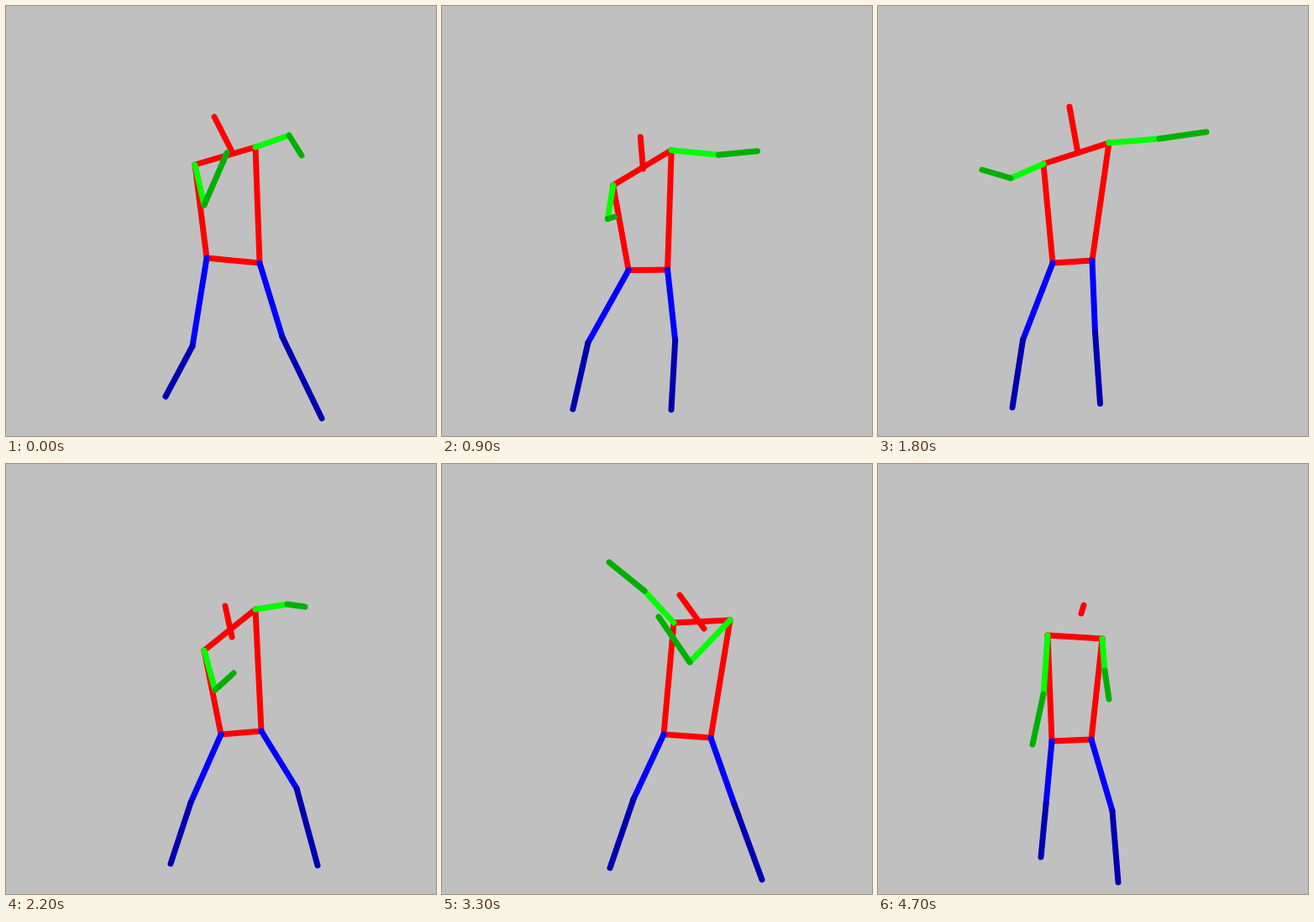
An HTML page for the animation above (4.8 s loop, 512 by 512 pixels).

```html
<!DOCTYPE html>
<html lang="en">
<head>
<meta charset="utf-8">
<title>Dancing stick figure</title>
<style>
  html, body { margin: 0; width: 100%; height: 100%; overflow: hidden; background: #c0c0c0; }
  svg { display: block; width: 100vw; height: 100vh; }
  line { stroke-width: 7; stroke-linecap: round; }
</style>
</head>
<body>
<svg id="stage" viewBox="0 0 512 512"></svg>
<script>
const LOOP = 4800, STEP = 100;
const tracks = {};

// A pose may name only some joints; the rest glide on to their next key.
function pose(time, joints) {
  for (const [name, point] of Object.entries(joints)) {
    (tracks[name] ||= []).push({ time, point });
  }
}

pose(0, {
  head: [248, 132], neck: [270, 175], lShoulder: [225, 189], rShoulder: [297, 168],
  lElbow: [236, 237], lHand: [263, 175], rElbow: [337, 154], rHand: [352, 178],
  lHip: [239, 300], rHip: [302, 306], lKnee: [222, 405], lFoot: [190, 465],
  rKnee: [329, 394], rFoot: [376, 491]
});
pose(300, { rFoot: [374, 503] });
pose(500, {
  head: [266, 178], neck: [261, 205], lShoulder: [236, 232], rShoulder: [292, 186],
  lElbow: [264, 273], lHand: [282, 231], rElbow: [344, 184], rHand: [389, 177],
  lHip: [256, 327], rHip: [305, 327], lKnee: [213, 408], lFoot: [184, 478],
  rKnee: [363, 405], rFoot: [365, 490]
});
pose(600, { lFoot: [175, 480] });
pose(700, {
  head: [264, 168], neck: [264, 200], lShoulder: [234, 224], rShoulder: [300, 178],
  rElbow: [360, 181], rHand: [418, 173], lHip: [255, 322], rHip: [304, 322]
});
pose(1400, {
  head: [167, 126], neck: [178, 178], lShoulder: [128, 187], rShoulder: [206, 156],
  lElbow: [114, 229], lHand: [110, 276], rElbow: [253, 168], rHand: [269, 172],
  lHip: [140, 296], rHip: [180, 294], lKnee: [125, 392], lFoot: [124, 480],
  rKnee: [171, 390], rFoot: [158, 469]
});
pose(1800, {
  head: [228, 120], neck: [238, 175], lShoulder: [197, 188], rShoulder: [275, 163],
  lElbow: [158, 205], lHand: [124, 195], rElbow: [335, 158], rHand: [391, 150],
  lHip: [208, 306], rHip: [255, 303]
});
pose(2200, {
  head: [261, 169], neck: [269, 206], lShoulder: [236, 222], rShoulder: [297, 173],
  lElbow: [249, 269], lHand: [271, 249], rElbow: [335, 167], rHand: [356, 170],
  lHip: [256, 322], rHip: [304, 318], lKnee: [220, 403], lFoot: [196, 476],
  rKnee: [346, 386], rFoot: [371, 478]
});
pose(2700, { rElbow: [368, 188], rHand: [409, 165] });
pose(3100, { lElbow: [237, 137], lHand: [186, 86] });
pose(3300, {
  head: [283, 156], neck: [312, 196], lShoulder: [276, 189], rShoulder: [343, 186],
  lElbow: [241, 151], lHand: [199, 117], rElbow: [295, 236], rHand: [258, 182],
  lHip: [264, 322], rHip: [320, 326], lKnee: [228, 399], lFoot: [200, 481],
  rKnee: [348, 405], rFoot: [381, 495]
});
pose(3900, {
  head: [298, 128], neck: [307, 178], lShoulder: [268, 184], rShoulder: [343, 174],
  lElbow: [254, 240], lHand: [284, 217], rElbow: [378, 216], rHand: [330, 190],
  lHip: [288, 292], rHip: [346, 298], lKnee: [300, 413], lFoot: [298, 508],
  rKnee: [375, 353], rFoot: [374, 438]
});
pose(4100, { lElbow: [190, 170], lHand: [132, 130] });
pose(4300, { rElbow: [350, 215], rHand: [392, 205] });
pose(4700, {
  head: [245, 168], neck: [242, 178], lShoulder: [202, 204], rShoulder: [267, 208],
  lElbow: [197, 274], lHand: [184, 334], rElbow: [270, 246], rHand: [275, 280],
  lHip: [207, 330], rHip: [254, 328], lKnee: [200, 405], lFoot: [194, 468],
  rKnee: [279, 413], rFoot: [286, 498]
});

const RED = "#f00", GREEN = "#0f0", DARK_GREEN = "#00b000", BLUE = "#00f", DARK_BLUE = "#0000b0";
const bones = [
  ["neck", "head", RED],
  ["lShoulder", "rShoulder", RED],
  ["lShoulder", "lHip", RED],
  ["rShoulder", "rHip", RED],
  ["lHip", "rHip", RED],
  ...["l", "r"].flatMap(side => [
    [side + "Shoulder", side + "Elbow", GREEN],
    [side + "Elbow", side + "Hand", DARK_GREEN],
    [side + "Hip", side + "Knee", BLUE],
    [side + "Knee", side + "Foot", DARK_BLUE]
  ])
];

const stage = document.getElementById("stage");
const lines = bones.map(([, , color]) => {
  const line = document.createElementNS("http://www.w3.org/2000/svg", "line");
  line.setAttribute("stroke", color);
  return stage.appendChild(line);
});

function jointAt(name, time) {
  const keys = tracks[name];
  const next = keys.findIndex(key => key.time > time);
  if (next < 0) return keys[keys.length - 1].point;
  const a = keys[next - 1], b = keys[next];
  const mix = (time - a.time) / (b.time - a.time);
  return a.point.map((v, i) => v + (b.point[i] - v) * mix);
}

function draw(time) {
  bones.forEach(([from, to], i) => {
    const [x1, y1] = jointAt(from, time), [x2, y2] = jointAt(to, time);
    for (const [key, value] of Object.entries({ x1, y1, x2, y2 })) {
      lines[i].setAttribute(key, value);
    }
  });
}

const start = performance.now();
function tick() {
  const elapsed = (performance.now() - start) % LOOP;
  draw(Math.floor(elapsed / STEP) * STEP);
  requestAnimationFrame(tick);
}
tick();
</script>
</body>
</html>
```
